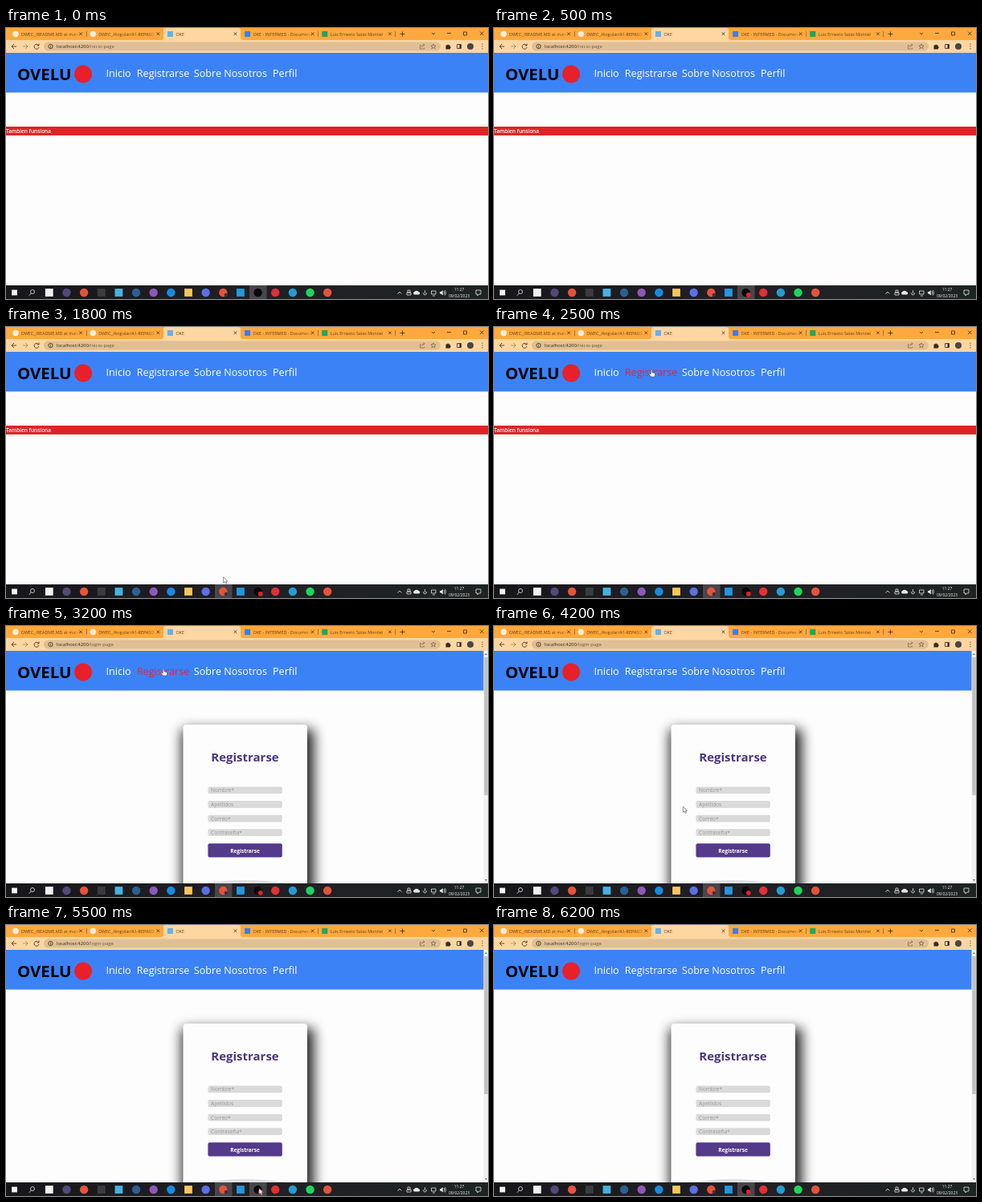
Write an HTML page that moves like this. It is 600x338 px and loops after 6.3 s.

```html
<!DOCTYPE html>
<html lang="es">
<head>
<meta charset="utf-8">
<title>Registro</title>
<style>
html, body { margin: 0; height: 100%; overflow: hidden; background: #fdfdfd }
body > svg { display: block; width: 100vw; height: 100vh }
text { font-family: "Open Sans", "Noto Sans", sans-serif; white-space: pre }
.b { font-weight: 700 }
.mid { text-anchor: middle }
.line { fill: none; stroke: #4a3a26; stroke-width: .9 }
.tray { fill: none; stroke: #e4e4e4; stroke-width: .8 }
</style>
</head>
<body>
<svg viewBox="0 0 600 338" preserveAspectRatio="none">
  <defs>
    <linearGradient id="fade" gradientUnits="userSpaceOnUse" x1="62" x2="75">
      <stop stop-color="#5b4120"/><stop offset="1" stop-color="#5b4120" stop-opacity="0"/>
    </linearGradient>
    <linearGradient id="bar"><stop stop-color="#17171a"/><stop offset=".5" stop-color="#211f25"/><stop offset="1" stop-color="#1d2422"/></linearGradient>
    <filter id="blur" x="-30%" y="-30%" width="160%" height="160%"><feGaussianBlur stdDeviation="8"/></filter>
  </defs>

  <!-- Page -->
  <rect width="600" height="338" fill="#fdfdfd"/>
  <rect y="31" width="600" height="49.500" fill="#3b82f6"/>
  <text class="b" x="14" y="65" font-size="20.4">OVELU</text>
  <circle cx="96" cy="57.500" r="11" fill="#e8202a"/>
  <g font-size="12.6" fill="#fff">
    <text x="124.500" y="61.300">Inicio</text>
    <text id="link" x="162.800" y="61.300">Registrarse</text>
    <text x="233.800" y="61.300">Sobre Nosotros</text>
    <text x="332" y="61.300">Perfil</text>
  </g>

  <g id="home">
    <rect y="123" width="600" height="11" fill="#df2426"/>
    <text x="0" y="131" font-size="6.5" font-weight="600" fill="#fff">Tambien funsiona</text>
  </g>

  <g id="login">
    <rect x="219" y="129" width="164" height="240" fill="#000" opacity=".88" filter="url(#blur)"/>
    <rect x="220.500" y="123" width="154.500" height="220" rx="4" fill="#fdfdfd"/>
    <text class="b mid" x="297.500" y="168.500" font-size="15" fill="#4c3684">Registrarse</text>
    <g id="fields"></g>
    <rect x="251.400" y="271.200" width="92.400" height="17.200" rx="2" fill="#533a8b"/>
    <text class="b mid" x="297.500" y="282.500" font-size="6.5" fill="#fff">Registrarse</text>
    <ellipse cx="297.500" cy="332.500" rx="76" ry="15.500" fill="#dedee0"/>
    <rect x="594.500" y="31" width="5.500" height="290" fill="#f1f1f1"/>
    <rect x="595.300" y="39" width="4.400" height="172" fill="#c1c1c1"/>
    <path d="M596 36l1.500-2 1.500 2zM596 316l1.500 2 1.500-2z" fill="#666"/>
  </g>

  <!-- Browser -->
  <rect width="600" height="16" fill="#ffa83d"/>
  <path d="M193 15q3 0 3-3V3q0-3 3-3h90q3 0 3 3v9q0 3 3 3z" fill="#fdd6a2"/>
  <rect y="15" width="600" height="16" fill="#fdd6a2"/>
  <rect x="47" y="17.500" width="494" height="11" rx="5.500" fill="#e0bf95"/>
  <g id="tabs"></g>
  <path class="line" d="M100.500 4v7M388.500 4v7M484.500 4v7" opacity=".5"/>
  <path class="line" d="M490.500 7.500h6M493.500 4.500v6M530 6l2 2 2-2M549 6.500h5M569.500 5h4v4h-4zM590 4.500l4.500 4.500M594.500 4.500l-4.500 4.500"/>
  <path class="line" d="M13 23H7m3-3-3 3 3 3M40.500 21.500A3 3 0 1 0 41 24M41 19.500v2.500h-2.500"/>
  <path class="line" d="M21 23h6m-3-3 3 3-3 3" opacity=".45"/>
  <circle class="line" cx="55.500" cy="23" r="2.700"/>
  <path class="line" d="M55.500 22.500v2M55.500 21.200v.6"/>
  <text x="63" y="25.200" font-size="5.92" fill="#332b20">localhost:4200<tspan id="path" fill="#6a5a44"></tspan></text>
  <path class="line" d="M517 21.500h-1.500v4.500h5v-1.500M517.500 24q0-3 3.500-3m-1.500-1.500 1.500 1.500-1.500 1.500M532 20l.9 2h2.200l-1.700 1.400.7 2.300-2.100-1.300-2.100 1.300.7-2.300-1.700-1.400h2.200z" opacity=".55"/>
  <path d="M547.500 21.500h1.700a1 1 0 0 1 2 0h1.600v1.700a1 1 0 0 1 0 2v1.300h-5.300z" fill="#332b20"/>
  <path d="M561.500 20.500h5v5h-5z" class="line"/><path d="M564.500 20.500h2v5h-2z" fill="#332b20"/>
  <circle cx="578" cy="23" r="4" fill="#4a4548"/>
  <path d="M593 19.500v1.300m0 1.500v1.300m0 1.500v1.300" class="line" stroke-width="1.200"/>

  <!-- Taskbar -->
  <rect y="321" width="600" height="17" fill="url(#bar)"/>
  <rect id="litWeb" x="260" y="321" width="21.500" height="17" fill="#48454b"/>
  <rect id="litRec" x="303" y="321" width="21.500" height="17" fill="#48454b"/>
  <g id="icons"></g>
  <circle cx="33" cy="329" r="2.500" class="tray"/><path class="tray" d="M31.200 331l-2.500 2.800"/>
  <circle cx="273.800" cy="333" r="2.200" fill="#3b3438"/>
  <circle id="rec" cx="316.800" cy="332.800" r="2.900" fill="#e3232b"/>
  <path class="tray" d="M487.500 331.500l2.500-2.500 2.500 2.500M500 327h3v3h-3zM499 330h5v3h-5zM521.500 327v4M519.500 330q0 3 2 3t2-3M529.500 328h5.500v4h-5.500zM531 334h3M545 328q1.500 2.200 0 4.500M546.500 327q2.200 3.500 0 6.500M585 327h6v5h-2.500l-1.500 2v-2h-2z"/>
  <path d="M508.500 332.500a1.800 1.800 0 0 1 0-3.500 3 3 0 0 1 5 0 1.800 1.800 0 0 1 .5 3.500zM540 329h1.500l2.300-2v6.500l-2.300-2H540z" fill="#e8e8e8"/>
  <g class="mid" font-size="4.9" fill="#f0f0f0"><text x="564" y="328">11:27</text><text x="564" y="336.200">09/02/2023</text></g>

  <!-- Pointer, with its tip at the origin -->
  <g id="pointer" stroke="#4a4a4a" stroke-width=".6" stroke-linejoin="round">
    <path id="arrow" fill="#fff" d="M0 0v7.300l1.700-1.500 1.300 2.700 1.300-.6-1.300-2.600h2.200z"/>
    <path id="hand" fill="#fff" d="M-.8.600Q0-.5.800.600V3.800l3 .7q.8.300.7 1.500L4 9H-.5L-3 5.800q-.2-1.300 1-.8l1.200 1z"/>
  </g>
</svg>
<script>
const $ = id => document.getElementById(id);
const show = (id, on) => $(id).setAttribute('visibility', on ? 'visible' : 'hidden');
const LOOP = 6300;

const tabs = [
  ['DWEC_/README.MD at main', '#fff0dc'],
  ['DWEC_/Angular/A1-REPASO', '#fff0dc'],
  ['OKE', '#62b2ec'],
  ['OKE - INTERMED - Documentos', '#3f7de8'],
  ['Luis Ernesto Salas Montiel', '#1fa463']
];
$('tabs').innerHTML = tabs.map(([name, color], i) => {
  const x = i * 96.2;
  const shape = i < 2
    ? `<circle cx="${x + 12}" cy="7.500" r="3.700" fill="${color}"/>`
    : `<rect x="${x + 8.5}" y="4" width="7" height="7" fill="${color}"/>`;
  return shape +
    `<svg x="${x + 19}" width="73" height="15"><text y="9.500" font-size="5.4" fill="url(#fade)">${name}</text></svg>` +
    `<path class="line" d="M${x + 91.300} 5.500l3.600 3.600m0-3.600l-3.600 3.600"/>`;
}).join('');

$('fields').innerHTML = ['Nombre*', 'Apellidos', 'Correo*', 'Contraseña*'].map((label, i) => {
  const y = 200.5 + i * 17.6;
  return `<rect x="251.400" y="${y}" width="92.400" height="8.800" rx="2" fill="#dadada"/>
    <text x="255" y="${y + 6.8}" font-size="6.6" fill="#999">${label}</text>`;
}).join('');

// Taskbar slots: shape (s = square, c = circle) and colour; an empty slot holds the search glass
const icons = 's#f4f4f4,,s#f0f0f0,c#54487a,c#e5533d,s#3c3c3e,s#45b3e0,c#2e5f91,c#8c58ba,c#168be0,s#f3c75a,c#5b70e5,c#e5533d,s#2497de,c#08080a,c#e32f36,c#269bd3,c#1ed45e,c#e5533d';
$('icons').innerHTML = icons.split(',').map((icon, i) => {
  const x = 10.5 + i * 21.65, color = icon.slice(1), r = i ? 4.9 : 3.4;
  if (!icon) return '';
  return icon[0] === 'c'
    ? `<circle cx="${x}" cy="330" r="5.200" fill="${color}"/>`
    : `<rect x="${x - r}" y="${330 - r}" width="${2 * r}" height="${2 * r}" fill="${color}"/>`;
}).join('');

// Pointer stops: time, x, y
const stops = [
  [600, 345, 340], [1000, 275, 327], [1700, 275, 327], [2400, 196, 53], [3200, 196, 53],
  [3800, 235.3, 225.2], [4500, 235.3, 225.2], [5200, 315, 328.5], [5800, 315, 328.5],
  [6000, 360, 330], [6100, 363, 340]
];
const ease = k => k * k * (3 - 2 * k);

function pointerAt(t) {
  const i = stops.findIndex(s => s[0] > t);
  if (i < 1) return null;
  const [t0, x0, y0] = stops[i - 1], [t1, x1, y1] = stops[i];
  const k = ease((t - t0) / (t1 - t0));
  return [x0 + (x1 - x0) * k, y0 + (y1 - y0) * k];
}

function draw(now) {
  const t = Math.floor(now % LOOP / 100) * 100;
  const pos = pointerAt(t);
  const onLogin = t >= 2700;
  const hover = !!pos && pos[0] > 162 && pos[0] < 228 && pos[1] > 45 && pos[1] < 68;

  show('home', !onLogin);
  show('login', onLogin);
  $('path').textContent = onLogin ? '/login-page' : '/inicio-page';
  $('link').setAttribute('fill', hover ? '#e5263c' : '#fff');
  show('litWeb', t >= 1000 && t < 5800);
  show('litRec', t < 1000 || t >= 5200);
  show('rec', t >= 300);

  $('pointer').setAttribute('display', pos ? 'inline' : 'none');
  if (pos) $('pointer').setAttribute('transform', `translate(${pos})`);
  show('hand', hover);
  show('arrow', !hover);
}

const start = performance.now();
(function tick() {
  draw(performance.now() - start);
  requestAnimationFrame(tick);
})();
</script>
</body>
</html>
```
